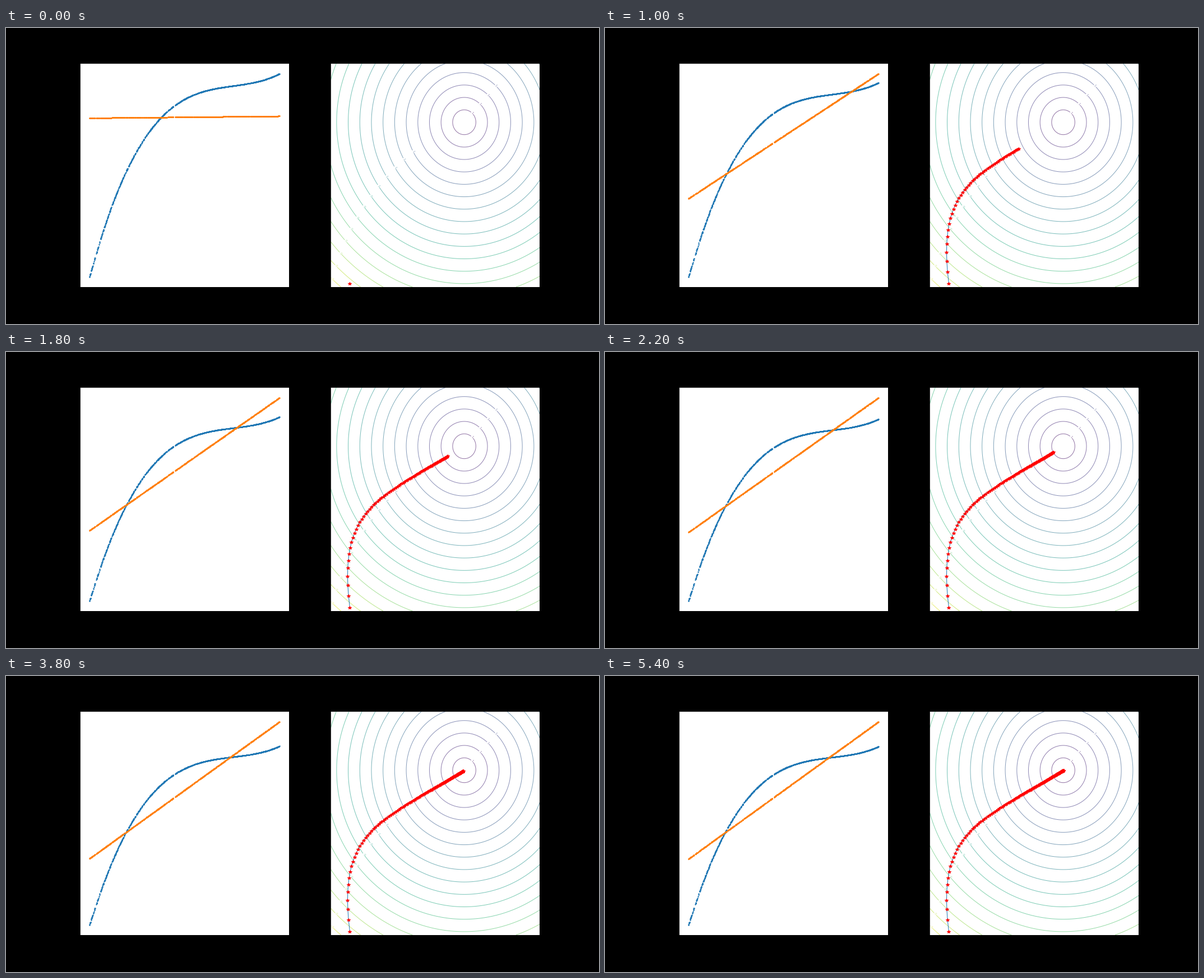
A matplotlib script that plays this animation: 1058 by 529 pixels, repeating every 5600 ms.

```python
import numpy as np
import matplotlib.pyplot as plt
from matplotlib.animation import FuncAnimation

PX = 0.72            # points per pixel at 100 dpi
FRAMES, STEPS = 28, 10

fig, (fit_ax, loss_ax) = plt.subplots(1, 2, figsize=(10.58, 5.29), dpi=100)
fig.set_facecolor("black")
fig.subplots_adjust(left=0.125, right=0.9, bottom=0.125, top=0.88, wspace=0.2)
for ax in (fit_ax, loss_ax):
    ax.set_xticks([])
    ax.set_yticks([])
    for spine in ax.spines.values():
        spine.set_linewidth(0.8 * PX)

# Random samples of a cubic
rng = np.random.default_rng(4)
t = np.sort(np.append(rng.random(1000), [0, 1]))
h = 3.473 * t - 4.423 * t**2 + 1.95 * t**3

dots = dict(ls="none", marker=".", ms=3 * PX, mew=1 * PX)
fit_ax.plot(t, h, color="C0", **dots)
line, = fit_ax.plot([], [], color="C1", **dots)
fit_ax.set_xlim(-0.05, 1.05)

# Loss rings, one unit apart around the optimum
levels = np.arange(1, 18)
gu, gv = np.meshgrid(np.linspace(-11.5, 6.5, 240), np.linspace(-13.27, 4.73, 240))
rings = loss_ax.contour(gu, gv, np.hypot(gu, gv), levels=levels, cmap="viridis",
                        vmin=0, vmax=18, alpha=0.6, linewidths=1 * PX)
loss_ax.set_xlim(-11.5, 6.5)
loss_ax.set_ylim(-13.27, 4.73)

# Inner labels sit upper right, outer ones fan out at lower left
angle = np.radians(np.where(levels < 5, 47, 200 + 1.65 * levels))
spots = np.column_stack([levels * np.cos(angle), levels * np.sin(angle)])
loss_ax.clabel(rings, fontsize=5 * PX, inline=True, inline_spacing=1,
               fmt=lambda v: "1" if v < 10 else "0", manual=spots)

trail, = loss_ax.plot([], [], color="C0", lw=1 * PX, zorder=4)
stars, = loss_ax.plot([], [], ls="none", marker="*", color="red",
                      ms=6 * PX, mew=1 * PX, zorder=5)


def descend(k):
    """Position after k descent steps: a slow and a fast decaying mode."""
    slow, fast = 0.97596**k, 0.866**k
    return 0.043 - 13.088 * slow + 3.187 * fast, -7.165 * slow - 5.858 * fast


def update(i):
    k = i * STEPS
    path = descend(np.arange(k + 1))
    trail.set_data(*path)
    stars.set_data(*path)

    # The fitted line trails the last star by one step
    u, v = descend(max(k - 1, 0))
    pred = 0.9385 + 0.0152 * u + (0.770 + 0.0584 * v) * (t - 0.739)
    line.set_data(t, pred)
    top = max(h.max(), pred.max())
    fit_ax.set_ylim(-0.05 * top, 1.05 * top)
    return line, trail, stars


anim = FuncAnimation(fig, update, frames=FRAMES, interval=200,
                     init_func=lambda: update(0), repeat=True, repeat_delay=0)
plt.show()
```
